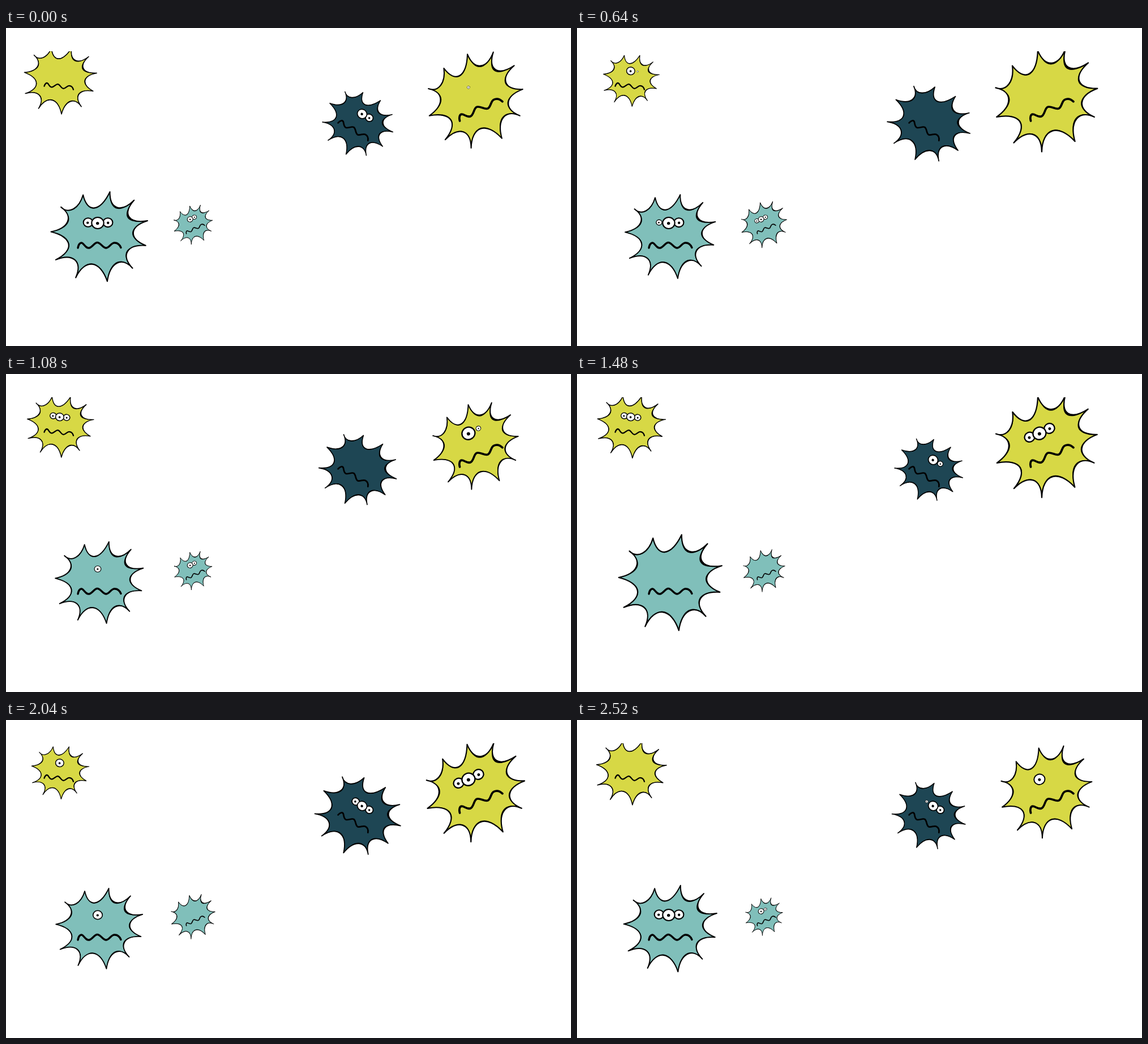
An HTML page with a canvas for the animation above (2560 ms loop, 998 by 561 pixels).

```html
<!DOCTYPE html>
<html lang="en">
<head>
<meta charset="utf-8">
<title>Wobbly germs</title>
<style>
html, body { margin: 0; width: 100%; height: 100%; overflow: hidden; background: #fff; }
canvas { display: block; }
</style>
</head>
<body>
<canvas id="stage" width="998" height="561"></canvas>
<script>
const ctx = document.getElementById('stage').getContext('2d');
const LOOP = 2560, STEP = 40, PULSE = 1306;

// spike tip x, y, then the dip after it x, y and its extra ink
const SPIKES = [
  [-30.5, -78.5, -9, -54, 1.5],
  [20.5, -84.5, 34, -55, 2.6],
  [66.5, -68.5, 57, -37, 3.4],
  [92, -29.5, 65, -7, 2],
  [88.5, 17.5, 54, 29, 1.8],
  [63.5, 60.5, 34, 51, 2],
  [15.5, 85.5, -13, 53, 1.6],
  [-44.5, 78.5, -46, 45, 1.2],
  [-82.5, 44.5, -58, 15, 1.3],
  [-91.5, -8.5, -60, -28, 2],
  [-72.5, -55.5, -49, -52, 1.3]
];

// x, y, radius, pupil radius, pupil dx; in order of opening
const EYES = [
  [-2.5, -23.5, 10.3, 2.7, -0.3],
  [15.4, -24.3, 8.2, 2.2, 0.3],
  [-19.5, -24.5, 8, 2.2, -0.8]
];

// peak: moment of the largest body, with all eyes open
const GERMS = [
  { x: 94.6, y: 91.9, size: 0.682, turn: 7, peak: 1312, color: '#d7d845' },
  { x: 621, y: 168.8, size: 0.806, turn: 31, peak: 2083, color: '#1e4654' },
  { x: 829.8, y: 127, size: 1.09, turn: -24, peak: 1720, color: '#d7d845' },
  { x: 164.5, y: 367.5, size: 1, turn: 0, peak: 237, color: '#80bfba' },
  { x: 330.7, y: 347, size: 0.468, turn: -24, peak: 518, color: '#80bfba' }
];

// Bezier control points of the dip between two tips, passing through (vx, vy)
function dip(i, inset) {
  const [ax, ay, vx0, vy0, ink] = SPIKES[i];
  const [bx, by] = SPIKES[(i + 1) % SPIKES.length];
  const f = 1 - inset * ink / Math.hypot(vx0, vy0);
  const mid = (a, b, v) => (8 * v * f - a - b) / 6;
  const mx = mid(ax, bx, vx0), my = mid(ay, by, vy0);
  const dx = (bx - ax) * 0.24, dy = (by - ay) * 0.24;
  return { ax, ay, bx, by, c: [mx - dx, my - dy, mx + dx, my + dy] };
}

const body = new Path2D(), ink = new Path2D();
SPIKES.forEach((tip, i) => {
  const outer = dip(i, 0), inner = dip(i, 1);
  if (!i) body.moveTo(outer.ax, outer.ay);
  body.bezierCurveTo(...outer.c, outer.bx, outer.by);
  const [x1, y1, x2, y2] = inner.c;
  ink.moveTo(outer.ax, outer.ay);
  ink.bezierCurveTo(...outer.c, outer.bx, outer.by);
  ink.bezierCurveTo(x2, y2, x1, y1, outer.ax, outer.ay);
  ink.closePath();
});
body.closePath();

const mouth = new Path2D(
  'M-37.5 20.5C-36.5 14-32.5 9-28.5 13C-24.5 17-22 21.5-17.5 20.5' +
  'C-12 19.5-8 10.5-3 11C3 11.5 7 21 12.5 20.5C18 20 21 12 26.5 11.5C31.5 11 36 14 38.5 20');

// signed distance to the closest multiple of period
const wrap = (t, period) => t - period * Math.round(t / period);
const clamp = v => Math.min(1, Math.max(0, v));

function drawEye([x, y, r, pupil, dx], s) {
  ctx.save();
  ctx.translate(x, y);
  ctx.scale(s, s);
  ctx.beginPath();
  ctx.ellipse(0, 0, r * 1.04, r * 0.97, 0, 0, 7);
  ctx.fillStyle = '#fff';
  ctx.fill();
  ctx.lineWidth = 2.1;
  ctx.stroke();
  ctx.beginPath();
  ctx.arc(dx, 0.6, pupil, 0, 7);
  ctx.fillStyle = '#000';
  ctx.fill();
  ctx.restore();
}

function drawGerm(g, t) {
  const grow = 1.016 - 0.239 * Math.abs(wrap(t - g.peak, PULSE)) / (PULSE / 2);
  const away = Math.abs(wrap(t - g.peak, PULSE * 2));
  ctx.save();
  ctx.translate(g.x, g.y);
  ctx.rotate(g.turn * Math.PI / 180);
  ctx.scale(g.size, g.size);

  ctx.save();
  ctx.scale(grow, grow);
  ctx.fillStyle = g.color;
  ctx.fill(body);
  ctx.fillStyle = '#000';
  ctx.fill(ink);
  ctx.lineWidth = 2.2;
  ctx.stroke(body);
  ctx.restore();

  ctx.lineWidth = 3.4;
  ctx.stroke(mouth);
  for (let i = 2; i >= 0; i--) {
    const open = clamp((925 - 215 * i - away) / 150);
    if (open > 0) drawEye(EYES[i], open);
  }
  ctx.restore();
}

function draw(t) {
  ctx.fillStyle = '#fff';
  ctx.fillRect(0, 0, 998, 561);
  ctx.save();
  ctx.beginPath();
  ctx.rect(0, 41, 998, 520);
  ctx.clip();
  ctx.strokeStyle = '#000';
  ctx.lineJoin = ctx.lineCap = 'round';
  GERMS.forEach(g => drawGerm(g, t));
  ctx.restore();
}

let start;
function tick(now) {
  start ??= now;
  const t = Math.max(0, now - start) % LOOP;
  draw(Math.floor(t / STEP) * STEP);
  requestAnimationFrame(tick);
}
draw(0);
requestAnimationFrame(tick);
</script>
</body>
</html>
```
